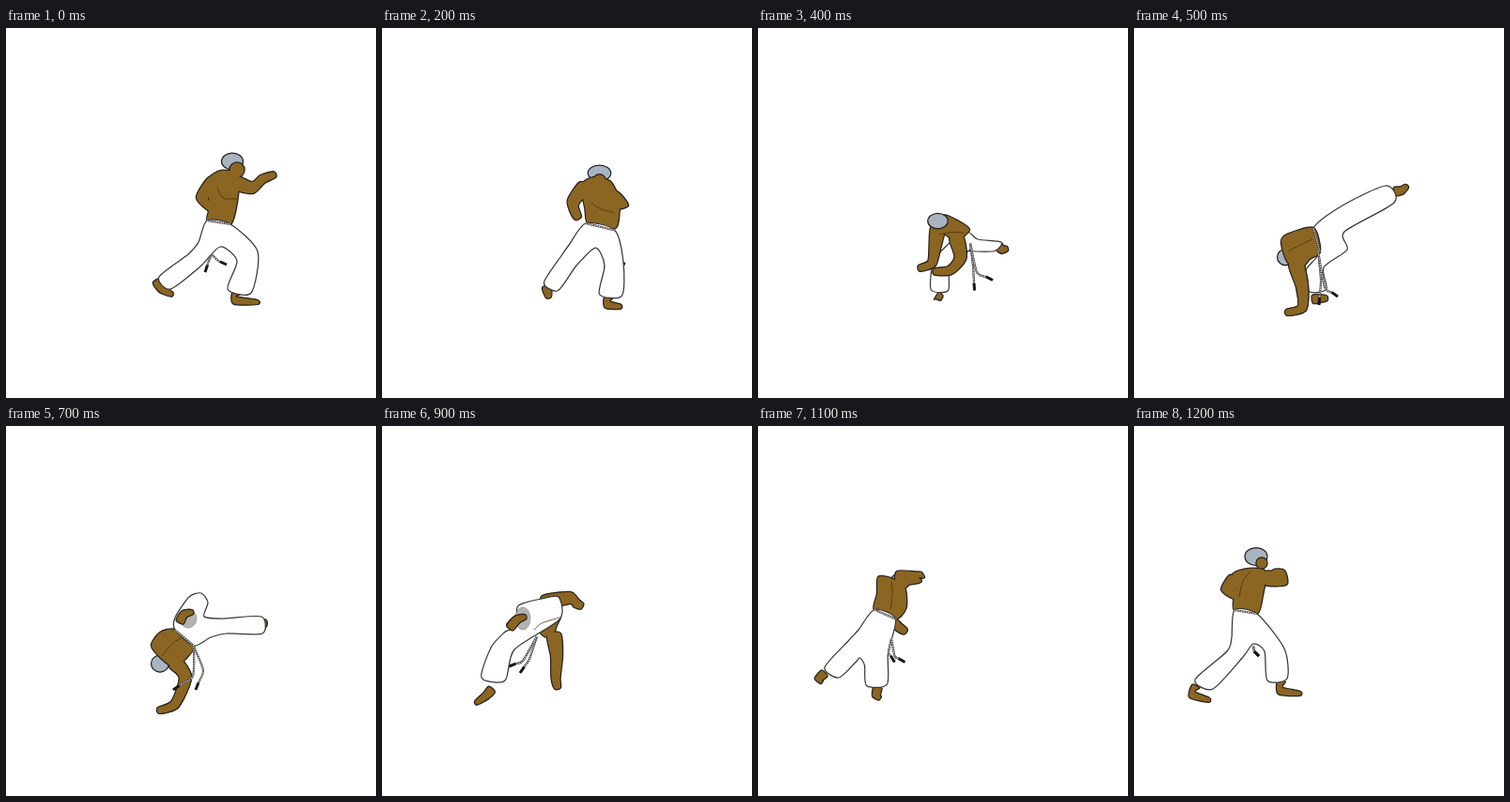
Write an HTML page that moves like this. It is 394 px wide and 394 px high and loops after 1.7 s.

```html
<!DOCTYPE html>
<html lang="en">
<head>
<meta charset="utf-8">
<title>Capoeira turn</title>
<style>
  html, body { margin: 0; width: 100%; height: 100%; overflow: hidden; background: #fff; }
  svg { display: block; width: 100%; height: 100%; }
  path, ellipse { fill: none; stroke: #25221d; stroke-width: 1.25; stroke-linejoin: round; }
  .skin { fill: #8b6522; }
  .edge { stroke-width: 2.5; }
  .flat { fill: #8b6522; stroke: none; }
  .cloth { fill: #fff; stroke: #38383a; }
  .hair { fill: #a9b4c2; }
  .cuff { fill: #b3b3b5; stroke: #888; stroke-width: .6; }
  .line { stroke: #4b3511; stroke-width: .8; }
  .cord { stroke: #444; stroke-width: 2.2; }
  .braid { stroke: #e4e4e4; stroke-width: 1.2; stroke-dasharray: 1.3 1.1; }
  .tip { stroke: #161616; stroke-width: 3; }
</style>
</head>
<body>
<svg id="stage" viewBox="0 0 394 394"></svg>
<script>
const LOOP = 1700, STEP = 100;
const ARM = [7, 6, 4.5, 3], FOOT = [4.5, 4.5, 2.5];

// Joints and outlines are x, y pairs; "order" lists the layers from back to front.
const guard = {
  order: 'feet tails hair torso line cloth belt',
  hair: [241, 142, 11.5, 9], face: [246, 151, 7.5],
  torso: [215, 206, 217, 190, 215, 162, 229, 152, 246, 156, 247, 178, 239, 209],
  armA: [240, 163, 262, 170, 273, 161, 286, 156],
  armB: [222, 163, 209, 181, 222, 193, 238, 196],
  cloth: [214, 205, 205, 228, 194, 241, 163, 265, 175, 278, 207, 254,
    228, 233, 246, 248, 236, 278, 261, 282, 268, 238, 239, 209],
  footA: [160, 269, 166, 278, 177, 284], footB: [245, 283, 244, 290, 268, 292],
  tails: [219, 241, 216, 248, 212, 260, 226, 248, 235, 252],
  line: [225, 170, 231, 181, 246, 182]
};

const stoop = {
  order: 'feet cloth tails torso hair line',
  hair: [222, 167, 13, 8], face: [217, 174, 5],
  torso: [226, 214, 216, 196, 211, 172, 222, 166, 240, 171, 257, 188, 259, 216],
  armA: [250, 195, 252, 214, 230, 218, 213, 216],
  armB: [211, 174, 198, 190, 191, 203, 181, 209],
  cloth: [220, 211, 194, 233, 188, 244, 182, 277, 200, 281, 207, 252,
    227, 235, 228, 258, 227, 289, 250, 288, 246, 261, 257, 222],
  footA: [190, 281, 187, 286, 178, 291], footB: [237, 292, 236, 299, 241, 302],
  tails: [256, 221, 259, 240, 264, 264, 263, 244, 283, 251],
  line: [221, 202, 234, 204, 248, 211]
};

const handstand = {
  order: 'feet cloth hair torso line belt tails',
  hair: [161, 244, 8.5, 8.5], face: [168, 240, 4],
  torso: [198, 238, 187, 246, 176, 258, 163, 248, 157, 228, 163, 220, 191, 213],
  armA: [172, 250, 179, 275, 179, 298, 163, 303],
  cloth: [198, 238, 184, 256, 182, 268, 187, 281, 205, 278, 202, 255,
    227, 236, 224, 217, 277, 186, 268, 168, 222, 189, 191, 213],
  footA: [190, 289, 199, 288, 206, 288], footB: [277, 174, 285, 173, 291, 168],
  tails: [196, 237, 199, 268, 197, 295, 203, 276, 217, 286],
  line: [164, 238, 177, 231, 190, 225]
};
handstand.armB = handstand.armA;

const tuck = {
  order: 'hair torso line feet cloth belt cuff footB tails',
  hair: [164, 253, 9.5, 9], face: [168, 240, 4],
  torso: [200, 234, 191, 248, 180, 257, 166, 248, 155, 234, 164, 220, 180, 217],
  armA: [180, 252, 191, 268, 180, 296, 163, 303],
  cloth: [200, 234, 218, 225, 235, 221, 273, 221, 272, 203, 232, 205,
    211, 203, 215, 188, 208, 178, 195, 182, 180, 204, 180, 217],
  footA: [272, 211, 276, 210, 278, 210], footB: [185, 209, 190, 200, 199, 198],
  cuff: [194, 205, 9, 10],
  tails: [200, 235, 210, 260, 202, 281, 199, 266, 178, 281],
  line: [166, 245, 178, 231, 190, 224]
};
tuck.armB = tuck.armA;

const landing = {
  order: 'feet tails torso cloth cuff footA line',
  hair: [178, 200, 5, 5], face: [178, 198, 4],
  torso: [186, 184, 188, 190, 190, 203, 186, 212, 182, 222, 173, 224, 168, 214],
  armA: [172, 188, 200, 183, 207, 189, 213, 192],
  armB: [183, 222, 186, 245, 185, 268, 187, 279],
  cloth: [188, 182, 170, 184, 153, 188, 144, 193, 143, 213, 136, 217,
    130, 220, 116, 236, 106, 268, 131, 271, 141, 238, 189, 206],
  footA: [136, 215, 144, 206, 153, 203], footB: [117, 280, 111, 287, 100, 295],
  cuff: [150, 205, 8, 12],
  tails: [165, 224, 157, 248, 147, 263, 150, 250, 135, 256],
  line: [162, 217, 170, 210, 189, 204]
};

const arch = {
  order: 'feet hair torso line cloth belt tails',
  hair: [170, 190, 5, 5], face: [174, 188, 5.5],
  torso: [141, 195, 147, 180, 151, 164, 160, 172, 172, 188, 178, 208, 161, 211],
  armA: [156, 162, 175, 160, 190, 163, 200, 167],
  armB: [172, 205, 174, 225, 190, 246, 202, 258],
  cloth: [141, 195, 110, 209, 94, 217, 77, 244, 88, 256, 91, 258,
    90, 262, 88, 270, 89, 282, 112, 281, 117, 246, 162, 211],
  footA: [76, 249, 67, 254, 57, 253], footB: [98, 285, 96, 292, 83, 295],
  tails: [157, 219, 150, 242, 158, 258, 163, 250, 180, 258],
  line: [160, 175, 170, 192, 171, 207]
};

const ready = {
  order: 'feet tails hair torso line cloth belt',
  hair: [130, 139, 12, 9.5], face: [136, 146, 5.5],
  torso: [107, 196, 107, 178, 105, 158, 122, 152, 140, 155, 137, 180, 131, 200],
  armA: [140, 162, 161, 163, 158, 158, 148, 156],
  armB: [108, 163, 99, 175, 106, 179, 112, 180],
  cloth: [107, 196, 104, 225, 99, 240, 65, 270, 84, 280, 116, 246,
    127, 232, 139, 240, 142, 271, 163, 269, 160, 237, 131, 200],
  footA: [66, 277, 62, 286, 80, 292], footB: [157, 272, 156, 282, 177, 285],
  tails: [127, 234, 128, 240, 133, 245, 128, 240, 133, 245],
  line: [124, 155, 116, 165, 112, 182]
};

// Halfway between two poses.
function between(a, b, order = a.order) {
  const pose = { order };
  for (const part in a) {
    if (part !== 'order' && b[part]) pose[part] = a[part].map((v, i) => (v + b[part][i]) / 2);
  }
  return pose;
}

const poses = [
  guard, between(guard, stoop),
  stoop, between(stoop, handstand),
  handstand, between(handstand, tuck),
  tuck, between(tuck, landing, 'hair torso feet cloth tails'),
  landing, arch, between(arch, ready), ready
];

const pairs = list => list.flatMap((x, i) => i % 2 ? [] : [[x, list[i + 1]]]);

// Soft curve through every point.
function curve(points, closed) {
  const n = points.length, ease = 0.13;
  const at = i => points[closed ? (i + n) % n : Math.max(0, Math.min(n - 1, i))];
  const shift = (p, a, b, k) => p.map((v, i) => (v + (b[i] - a[i]) * k).toFixed(1));
  let d = `M${points[0]}`;
  for (let i = 0; i < (closed ? n : n - 1); i++) {
    const from = at(i), to = at(i + 1);
    d += `C${shift(from, at(i - 1), to, ease)} ${shift(to, from, at(i + 2), -ease)} ${to}`;
  }
  return closed ? d + 'Z' : d;
}

// Outline of a limb that follows its joints at the given half widths.
function limb(list, radii) {
  const joints = pairs(list), left = [], right = [];
  joints.forEach(([x, y], i) => {
    const a = joints[Math.max(0, i - 1)], b = joints[Math.min(joints.length - 1, i + 1)];
    const angle = Math.atan2(b[1] - a[1], b[0] - a[0]);
    const dx = -Math.sin(angle) * radii[i], dy = Math.cos(angle) * radii[i];
    left.push([x + dx, y + dy]);
    right.unshift([x - dx, y - dy]);
  });
  return curve([...left, ...right], true);
}

const path = (kind, d) => `<path class="${kind}" d="${d}"/>`;
const oval = (kind, [x, y, rx, ry = rx]) =>
  `<ellipse class="${kind}" cx="${x}" cy="${y}" rx="${rx}" ry="${ry}"/>`;
const foot = list => path('skin', limb(list, FOOT));
const cord = points => path('cord', curve(points)) + path('braid', curve(points));

function tail(root, bend, end) {
  const length = Math.hypot(end[0] - bend[0], end[1] - bend[1]) || 1;
  const knot = end.map((v, i) => v - (v - bend[i]) * Math.min(1, 8 / length));
  return cord([root, bend, knot]) + path('tip', `M${knot}L${end}`);
}

const layers = {
  feet: p => foot(p.footA) + foot(p.footB),
  footA: p => foot(p.footA),
  footB: p => foot(p.footB),
  hair: p => oval('hair', p.hair),
  cuff: p => oval('cuff', p.cuff),
  line: p => path('line', curve(pairs(p.line))),
  cloth: p => path('cloth', curve(pairs(p.cloth), true)),
  belt: p => cord([p.cloth.slice(0, 2), p.cloth.slice(-2)]),
  tails(p) {
    const [root, bendA, endA, bendB, endB] = pairs(p.tails);
    return tail(root, bendA, endA) + tail(root, bendB, endB);
  },
  // Edges first, fills after, so the parts share one outline.
  torso(p) {
    const shapes = [curve(pairs(p.torso), true), limb(p.armA, ARM), limb(p.armB, ARM)];
    const paint = kind => shapes.map(d => path(kind, d)).join('') + oval(kind, p.face);
    return paint('edge') + paint('flat');
  }
};

const stage = document.getElementById('stage');
stage.innerHTML = poses
  .map(p => `<g display="none">${p.order.split(' ').map(name => layers[name](p)).join('')}</g>`)
  .join('');
const groups = [...stage.children];

// The first pose holds two steps and the last one rests until the loop ends.
function draw(ms) {
  const step = Math.floor((ms % LOOP) / STEP) - 1;
  const current = Math.max(0, Math.min(groups.length - 1, step));
  groups.forEach((g, i) => g.setAttribute('display', i === current ? 'inline' : 'none'));
}

const start = performance.now();
function tick() {
  draw(performance.now() - start);
  requestAnimationFrame(tick);
}
tick();
</script>
</body>
</html>
```
